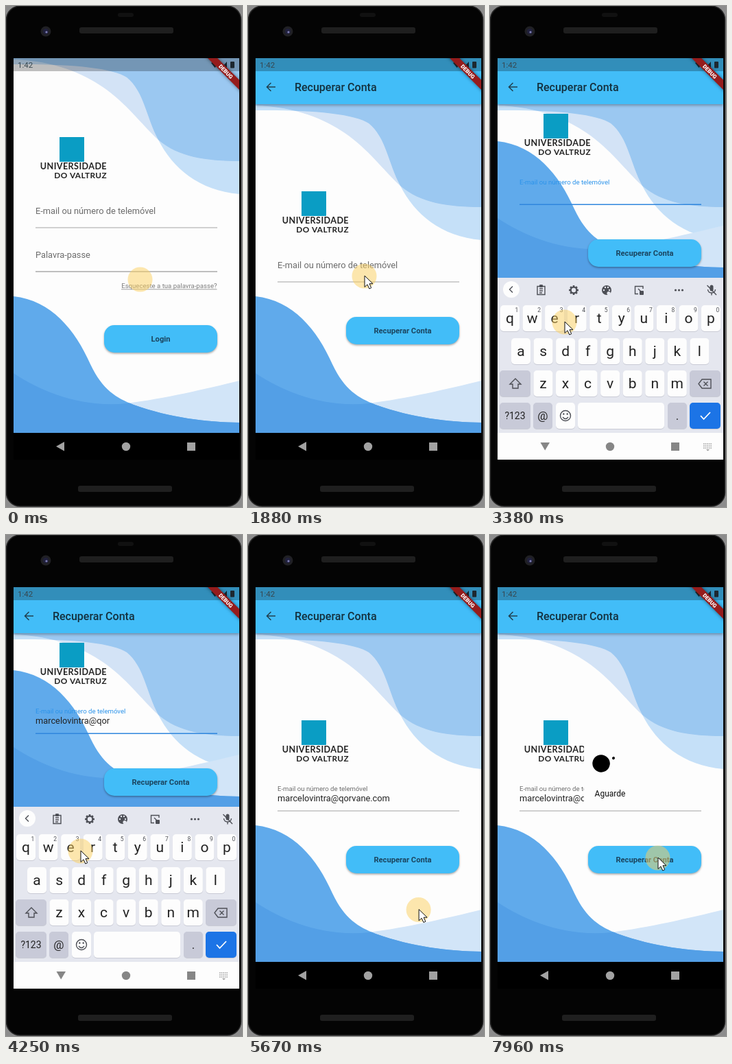
These frames come from a looping animation (344 by 730 pixels, 8000 ms). An HTML page with a canvas:

```html
<!DOCTYPE html>
<html lang="pt">
<head>
<meta charset="utf-8">
<style>
html, body { margin: 0; overflow: hidden; background: #000; }
canvas { display: block; width: 344px; height: 730px; }
</style>
</head>
<body>
<canvas id="stage" width="344" height="730"></canvas>
<script>
const c = document.getElementById('stage').getContext('2d');
const LOOP = 8000;
const WHITE = '#fdfdfd', BLUE = '#42bdf8', INK = '#222', MUTED = '#6c6c6c';
const BOARD = '#e5e7ef', SPECIAL = '#c8cad8', ICON = '#4d4f56';
const LABEL = 'E-mail ou número de telemóvel';
const EMAIL = 'marcelovintra@qorvane.com';
const BODY_BOTTOM = 622, KEYBOARD = 226;
const PUSH = 1240, FOCUS = 2020, TYPE = 3420, SUBMIT = 5360, LOADING = 7593;

// Pointer stops: time, x, y
const POINTER = [
  [0, 196, 398], [750, 246, 408], [1220, 246, 408], [1800, 170, 393], [2100, 170, 393],
  [2900, 109, 460], [4600, 109, 460], [5130, 308, 602], [5400, 308, 602],
  [6200, 87, 390], [6420, 87, 390], [7080, 245, 470], [8000, 245, 470]
];

const clamp = v => Math.max(0, Math.min(1, v));
const mix = (a, b, p) => a + (b - a) * p;
const ease = (t, start, length) => {
  const p = clamp((t - start) / length);
  return p * p * (3 - 2 * p);
};

function box(x, y, w, h, r, fill) {
  c.beginPath();
  c.roundRect(x, y, w, h, r);
  c.fillStyle = fill;
  c.fill();
}

function disc(x, y, r, fill) {
  c.beginPath();
  c.arc(x, y, r, 0, 7);
  c.fillStyle = fill;
  c.fill();
}

function shape(path, fill) {
  c.fillStyle = fill;
  c.fill(new Path2D(path));
}

function line(path, color, width = 1.4) {
  c.strokeStyle = color;
  c.lineWidth = width;
  c.stroke(new Path2D(path));
}

function text(str, x, y, size, color, { weight = 400, align = 'left', family = 'Roboto' } = {}) {
  c.font = `${weight} ${size}px ${family}, sans-serif`;
  c.textAlign = align;
  c.textBaseline = 'alphabetic';
  c.fillStyle = color;
  c.fillText(str, x, y);
}

function group(draw, x = 0, y = 0) {
  c.save();
  c.translate(x, y);
  draw();
  c.restore();
}

function clipBox(x, y, w, h) {
  c.beginPath();
  c.rect(x, y, w, h);
  c.clip();
}

function shadow(color, blur, offset) {
  c.shadowColor = color;
  c.shadowBlur = blur;
  c.shadowOffsetY = offset;
}

// Two overlapping waves, with their shared part in a third colour
function wavePair(first, second, colors, x, y) {
  group(() => {
    shape(first, colors[0]);
    shape(second, colors[1]);
    c.clip(new Path2D(first));
    shape(second, colors[2]);
  }, x, y);
}

function waves(top, bottom) {
  box(11, top, 329, bottom - top, 0, WHITE);
  wavePair(
    'M0 9C80 8 145 14 165 28C190 48 193 85 211 119C232 160 270 193 329 198V0H0Z',
    'M0 2C60 4 100 22 130 42C165 66 185 95 211 119C240 144 280 150 329 150V0H0Z',
    ['#c5e0f8', '#d3e3f6', '#9bc8f1'], 11, top);
  wavePair(
    'M0 -87C40 -60 100 -36 165 -43C220 -50 280 -64 329 -76V0H0Z',
    'M0 -199C55 -193 90 -150 112 -100C130 -62 150 -51 175 -41C230 -21.500 280 -16 329 -15V0H0Z',
    ['#d2e5f8', '#60aaeb', '#539fe6'], 11, bottom);
}

function logo(y) {
  box(78, y, 36, 36, 0, '#0a9dc4');
  c.letterSpacing = '0.4px';
  text('UNIVERSIDADE', 147, y + 47, 12.6, INK, { weight: 700, align: 'right', family: 'Lato' });
  text('DO VALTRUZ', 147, y + 60, 11.8, INK, { weight: 700, align: 'right', family: 'Lato' });
  c.letterSpacing = '0px';
}

function field(label, y, { float = 0, focus = false, value = '', rule = '#a4a4a4' } = {}) {
  text(label, 43, mix(y - 20, y - 29, float), mix(12.8, 9.6, float), focus ? '#2b93ea' : MUTED);
  text(value, 43, y - 14, 12.8, INK);
  box(43, y - 0.5, 265, focus ? 1.6 : 1, 0, focus ? '#2f86dd' : rule);
}

function button(label, y) {
  group(() => {
    shadow('rgba(0,0,0,.35)', 3, 1.5);
    box(143, y, 165, 40, 15, BLUE);
  });
  text(label, 225.5, y + 24, 11.2, '#1b4560', { weight: 700, align: 'center' });
}

function loginPage() {
  waves(76, BODY_BOTTOM);
  logo(191);
  field(LABEL, 323);
  field('Palavra-passe', 387, { rule: '#808080' });
  text('Esqueceste a tua palavra-passe?', 307.5, 411, 9.6, '#7c7c7c', { align: 'right' });
  box(168, 412.5, 139.5, 0.8, 0, '#7c7c7c');
  button('Login', 465);
}

function recoverPage(t, lift) {
  waves(143, BODY_BOTTOM - KEYBOARD * lift);
  group(() => {
    logo(270);
    field(LABEL, 402, {
      float: ease(t, FOCUS, 170),
      focus: t > FOCUS && t < SUBMIT,
      value: EMAIL.slice(0, Math.floor(clamp((t - TYPE) / 1200) * EMAIL.length))
    });
    button('Recuperar Conta', 453);
  }, 0, -KEYBOARD / 2 * lift);
  group(() => {
    shadow('rgba(0,0,0,.3)', 4, 1.5);
    box(11, 76, 329, 67, 0, BLUE);
  });
  line('M40 118H28M33.5 112L27.5 118L33.5 124', '#22404f', 1.5);
  text('Recuperar Conta', 68, 123.5, 16, '#14303e', { weight: 500 });
}

function statusBar() {
  box(11, 76, 329, 19, 0, 'rgba(0,0,0,.25)');
  text('1:42', 17, 90, 11.5, '#37474f');
  shape('M299 83Q304.500 78 310 83L304.500 90Z', '#1d2830');
  shape('M314 90L322 81V90Z', '#1d2830');
  box(327, 81, 6, 9.500, 1, '#1d2830');
  group(() => {
    c.rotate(Math.PI / 4);
    shadow('rgba(0,0,0,.5)', 5, 0);
    box(-45, 22.5, 90, 10, 0, '#951c1c');
    shadow('transparent', 0, 0);
    text('DEBUG', 0, 30.5, 8, '#fff', { weight: 900, align: 'center' });
  }, 340, 76);
}

function key(x, y, w, label, { size = 21, fill = WHITE, color = INK } = {}) {
  box(x, y + 1, w, 38, 5, '#c9cbd5');
  box(x, y, w, 38, 5, fill);
  text(label, x + w / 2, y + 19 + size * 0.33, size, color, { align: 'center' });
}

function toolbar() {
  disc(31, 413, 12, WHITE);
  line('M33 408.500L28.500 413L33 417.500', ICON);
  line('M69 408.500H80V420.500H69ZM72 412H77M72 415H77M72 418H76', ICON);
  box(72, 406, 5, 4, 1, ICON);
  for (let i = 0; i < 4; i++) group(() => {
    c.rotate(i * Math.PI / 4);
    box(-1.5, -7, 3, 14, 1, ICON);
  }, 122, 414);
  disc(122, 414, 5.3, ICON);
  disc(122, 414, 3.2, BOARD);
  disc(170, 414, 7, ICON);
  [[166, 414], [168, 410], [172, 410], [174, 414]].forEach(([x, y]) => disc(x, y, 1.2, BOARD));
  disc(173, 418.5, 2.6, BOARD);
  line('M216 419.500H211.500V408.500H223V412M216 412L222 418', ICON);
  box(218, 415, 6, 6, 1, ICON);
  [270.5, 275.5, 280.5].forEach(x => disc(x, 414, 1.6, ICON));
  box(320.5, 406.5, 5, 9, 2.5, ICON);
  line('M317.500 413Q318 418 323 418T328.500 413M323 418V421.500M316.500 407L330 421', ICON);
}

function keyboard() {
  const step = 32.55;
  box(11, 396, 329, 226, 0, BOARD);
  toolbar();
  [...'qwertyuiop'].forEach((ch, i) => {
    key(15 + i * step, 436, 28, ch);
    text((i + 1) % 10, 39 + i * step, 446, 8.5, ICON, { align: 'center' });
  });
  [...'asdfghjkl'].forEach((ch, i) => key(31 + i * step, 484, 28, ch));
  [...'zxcvbnm'].forEach((ch, i) => key(63.5 + i * step, 531, 28, ch));
  key(14, 531, 45, '', { fill: SPECIAL });
  line('M37 543L29 551H33V557H41V551H45Z', ICON);
  key(291, 531, 45, '', { fill: SPECIAL });
  line('M309 544H322V557H309L304 550.500ZM311.500 547.500L317.500 553.500M317.500 547.500L311.500 553.500', ICON);
  key(14, 578, 45, '?123', { size: 14, fill: SPECIAL });
  key(63, 578, 28, '@', { size: 17, fill: SPECIAL });
  key(96, 578, 28, '');
  line('M102.500 597a7.500 7.500 0 1 0 15 0a7.500 7.500 0 1 0 -15 0M106 599Q110 604 114 599', ICON);
  disc(107.3, 594.5, 1.2, ICON);
  disc(112.7, 594.5, 1.2, ICON);
  key(128, 578, 126, '');
  key(259, 578, 28, '.', { size: 17, fill: SPECIAL });
  key(291, 578, 45, '', { fill: '#1c74e6' });
  line('M307 597L311.500 602L321 592', '#fff', 1.8);
}

function navBar(open) {
  const color = open ? '#868686' : '#a2a2a2';
  box(11, 622, 329, 39, 0, open ? WHITE : '#000');
  shape(open ? 'M73.500 636H87L80.200 647.500Z' : 'M85 635V648.500L73 641.700Z', color);
  disc(175, 642, 6.2, color);
  box(264, 636, 12, 12, 0, color);
  if (open) {
    c.setLineDash([1.6, 1]);
    line('M311 638H324M311 641H324M311 644H324', '#a0a0a0', 1.6);
    c.setLineDash([]);
    shape('M315 646H320L317.500 648.500Z', '#a0a0a0');
  }
}

function loadingDialog(t) {
  const age = t - LOADING;
  if (age < 0) return;
  const turn = age / 2000, size = 49, off = size * 0.2;
  const curve = turn < 0.5 ? 2 * turn * turn : 1 - 2 * (1 - turn) ** 2;
  const grow = Math.abs(2 * curve - 1);
  c.save();
  c.globalAlpha = clamp(age / 200);
  box(137, 302, 76, 94, 4, WHITE);
  group(() => {
    c.rotate(turn * 2 * Math.PI);
    disc(-off, -off, size * 0.3 * (1 - grow), '#000');
    disc(-off, off, size * 0.3 * grow, '#000');
  }, 175, 338);
  text('Aguarde', 175, 381, 12, '#111', { align: 'center' });
  c.restore();
}

function pointer(t) {
  const i = POINTER.findIndex(p => p[0] > t);
  const [t0, x0, y0] = POINTER[i - 1], [t1, x1, y1] = POINTER[i];
  const p = ease(t, t0, t1 - t0);
  const x = mix(x0, x1, p), y = mix(y0, y1, p);
  disc(x - 0.5, y + 0.5, 18, 'rgba(252,208,95,.5)');
  if (t < 100) return;
  group(() => {
    const arrow = 'M0 0V16.500L4 12.800L6.800 19L9.700 17.700L7 11.700H12Z';
    shape(arrow, '#fff');
    line(arrow, '#111', 1);
  }, x, y);
}

function phone() {
  box(0, 0, 344, 730, 0, '#8c8c8c');
  box(0.5, 0, 342, 729, 20, '#040404');
  c.strokeStyle = '#262626';
  c.lineWidth = 1.5;
  c.stroke();
  box(107, 31, 137, 9, 3, '#1f1f1f');
  box(105, 699, 137, 9, 3, '#1f1f1f');
  box(163, 10, 23, 6, 3, '#111');
  disc(58, 37, 7.5, '#202024');
  disc(58, 37, 4, '#20203c');
  disc(59, 38, 1.6, '#8080b8');
}

function draw(t) {
  const enter = ease(t, PUSH, 300);
  const lift = ease(t, FOCUS + 60, 200) - ease(t, SUBMIT, 200);
  phone();
  group(() => {
    clipBox(11, 76, 329, 546);
    if (enter < 1) loginPage();
    if (enter > 0) group(() => {
      c.globalAlpha = enter;
      recoverPage(t, lift);
    }, 0, 136 * (1 - enter));
    if (lift > 0) group(keyboard, 0, KEYBOARD * (1 - lift));
    statusBar();
    loadingDialog(t);
  });
  navBar(lift > 0);
  pointer(t);
}

const start = performance.now();
function tick() {
  draw((performance.now() - start) % LOOP);
  requestAnimationFrame(tick);
}
tick();
</script>
</body>
</html>
```
